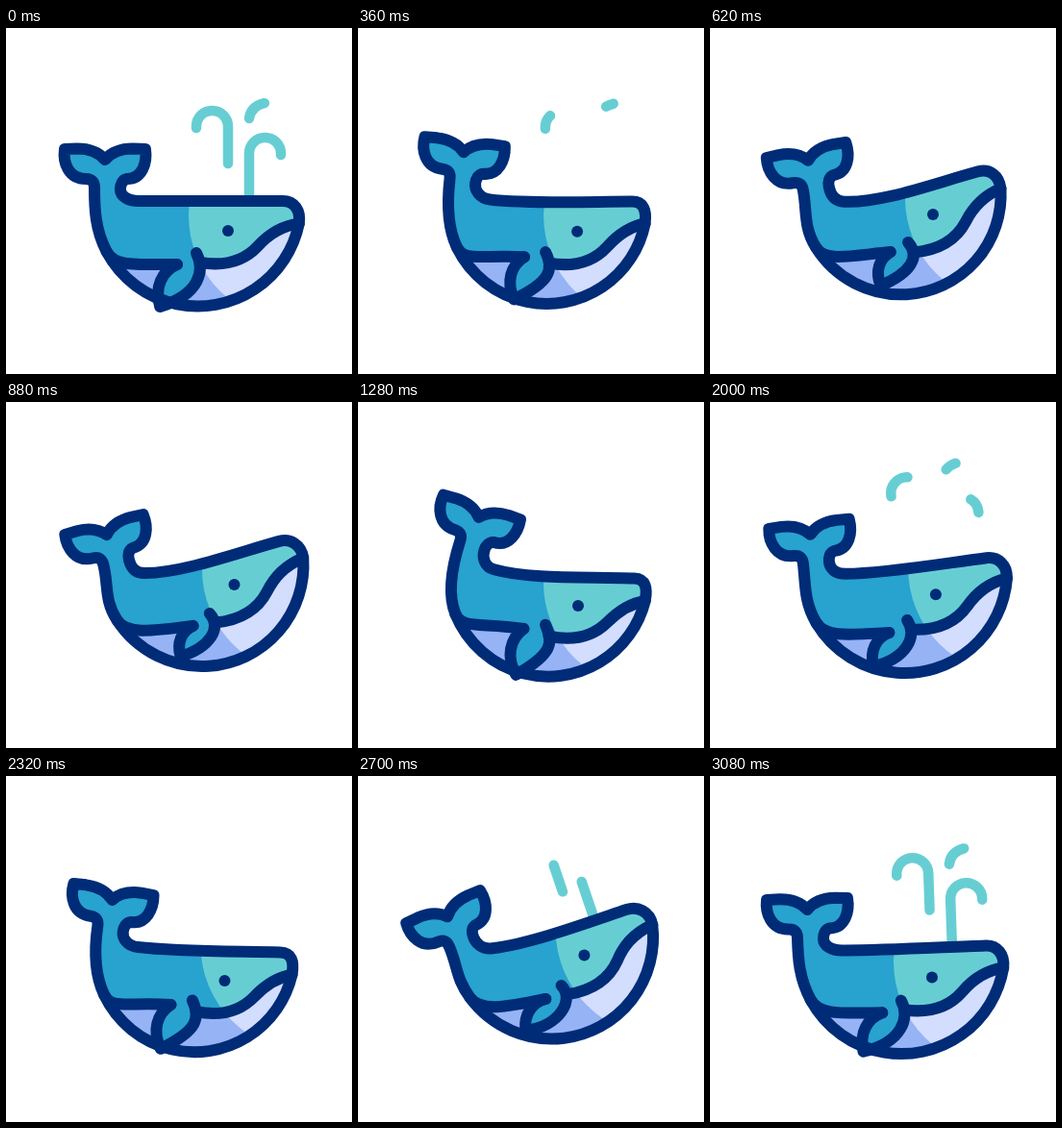
Write an HTML page with a canvas that moves like this. It is 360 px wide and 360 px high and loops after 3.1 s.

```html
<!DOCTYPE html>
<html lang="en">
<head>
<meta charset="utf-8">
<title>Whale</title>
<style>
html, body { margin: 0; width: 100%; height: 100%; overflow: hidden; background: #fff; }
canvas { display: block; width: 360px; height: 360px; }
</style>
</head>
<body>
<canvas id="stage" width="360" height="360"></canvas>
<script>
const ctx = document.getElementById('stage').getContext('2d');
const INK = '#002c77', BLUE = '#28a2ce', TEAL = '#66ced3', BELLY = '#96b3f5', PALE = '#d3ddfd';
const LOOP = 3100, CYCLE = 3000, BEAT = 1000;

// time, pitch, eye x, eye y
const headKeys = [
  [0, 0, 231, 211], [100, 4.5, 230, 219.5], [220, 1.5, 228, 214],
  [520, -15, 232, 194], [620, -19, 239, 186], [780, -15.5, 237.5, 190],
  [980, -1.5, 231.5, 209], [1100, 5, 229, 216.5], [1180, 2.5, 229, 212],
  [1600, -19.5, 244, 183], [1640, -19.7, 244, 183], [1780, -15.5, 241, 188],
  [1980, -1.5, 231, 209], [2100, 4.5, 228, 217], [2220, 1.5, 227.5, 213],
  [2520, -15, 230, 194], [2620, -19, 236, 186], [2780, -15, 235, 191],
  [2980, -2, 231, 209.5]
];
// time, angle, centre x, centre y
const tailKeys = [
  [0, 0, 103, 126], [100, 15, 120, 119], [220, 9, 113, 118],
  [520, -11, 100, 127], [620, -24, 92, 136], [780, -14.4, 102, 127.5],
  [980, -1.4, 103, 126], [1090, 21, 132, 105], [1180, 17.8, 129, 109.5],
  [1600, -26.6, 95, 136.5], [1640, -26.8, 95, 137], [1780, -15, 103, 128],
  [1980, -1, 103, 126], [2100, 12, 116, 117], [2220, 8.3, 112, 118],
  [2520, -12, 96, 128], [2620, -25, 88, 137], [2780, -15, 96, 129],
  [2980, -1.4, 101, 128]
];
// time, offset of the light patch from the eye
const lightKeys = [
  [0, 70, -16], [520, 82, -17], [780, 77.5, -16], [1180, 75, -24],
  [1600, 77.6, -18], [2220, 86, -37], [2980, 71, -16]
];
// beat time, flank lift, fin direction, fin length
const finKeys = [
  [0, 0, 112, 47.5], [180, -8.7, 99.5, 48.6], [220, -8.6, 103, 47],
  [520, -8.5, 106, 36.5], [600, -4.8, 122.5, 39], [780, -5, 112, 34.5],
  [980, 0, 116, 45]
];

// Periodic monotone cubic through the keys
function sample(keys, t, period) {
  const n = keys.length;
  const at = i => {
    const w = Math.floor(i / n), k = keys[i - w * n];
    return [k[0] + w * period, ...k.slice(1)];
  };
  let i = n - 1;
  while (keys[i][0] > t) i--;
  const [a, b, c, d] = [at(i - 1), at(i), at(i + 1), at(i + 2)];
  const h = c[0] - b[0], u = (t - b[0]) / h;
  const mix = (p, q) => p * q > 0 ? 2 * p * q / (p + q) : 0;
  return b.slice(1).map((v, j) => {
    j++;
    const s0 = (b[j] - a[j]) / (b[0] - a[0]);
    const s1 = (c[j] - b[j]) / h;
    const s2 = (d[j] - c[j]) / (d[0] - c[0]);
    const m0 = mix(s0, s1) * h, m1 = mix(s1, s2) * h;
    const u2 = u * u, u3 = u2 * u;
    return v * (2 * u3 - 3 * u2 + 1) + m0 * (u3 - 2 * u2 + u) +
      c[j] * (3 * u2 - 2 * u3) + m1 * (u3 - u2);
  });
}

const rad = d => d * Math.PI / 180;
const add = (p, q) => [p[0] + q[0], p[1] + q[1]];
const mid = (p, q) => [(p[0] + q[0]) / 2, (p[1] + q[1]) / 2];
const clamp = v => Math.max(0, Math.min(1, v));
const polar = (len, deg) => [len * Math.cos(rad(deg)), len * Math.sin(rad(deg))];
function turn(x, y, deg) {
  const c = Math.cos(rad(deg)), s = Math.sin(rad(deg));
  return [x * c - y * s, x * s + y * c];
}
const move = (p, q) => p.moveTo(...q);
const line = (p, q) => p.lineTo(...q);
const curve = (p, a, b, c) => p.bezierCurveTo(...a, ...b, ...c);

function stroke(path, color = INK, width = 12) {
  ctx.strokeStyle = color;
  ctx.lineWidth = width;
  ctx.stroke(path);
}
function fill(path, color) {
  ctx.fillStyle = color;
  ctx.fill(path);
}

const hook = (x, y0, y1, dir) => {
  const p = new Path2D();
  p.moveTo(x, y0);
  p.lineTo(x, y1);
  p.arc(x + dir * 16.5, y1, 16.5, dir > 0 ? Math.PI : 0, dir > 0 ? 0 : Math.PI, dir < 0);
  p.lineTo(x + dir * 33, y1 + 1.5);
  return p;
};
const drop = new Path2D('M253 94 Q255 81 269.5 78');
// path, length, draw start and end, erase start
const jets = [
  [hook(253, 178, 130.5, 1), 101, 0, 200, 560],
  [hook(231, 141, 102.5, -1), 92, 20, 210, 590],
  [drop, 24, 310, 400, 620]
];

function spout(u, eye, pitch) {
  ctx.save();
  ctx.translate(...eye);
  ctx.rotate(rad(pitch));
  ctx.translate(-231, -211);
  for (const [path, len, start, end, out] of jets) {
    const head = clamp((u - start) / (end - start)) * len;
    const tail = clamp((u - out) / 180) * len;
    if (head - tail < 0.5) continue;
    ctx.setLineDash([head - tail, 400]);
    ctx.lineDashOffset = -tail;
    stroke(path, TEAL, 10.5);
  }
  ctx.restore();
}

function draw(t) {
  const [pitch, ex, ey] = sample(headKeys, t, CYCLE);
  const [bend, cx, cy] = sample(tailKeys, t, CYCLE);
  const [lx, ly] = sample(lightKeys, t, CYCLE);
  const [lift, finDir, finLen] = sample(finKeys, t % BEAT, BEAT);
  const eye = [ex, ey];
  const body = (x, y) => add(eye, turn(x - 231, y - 211, pitch));
  const tail = (x, y) => add([cx, cy], turn(x, y, bend));

  // Round belly
  const hub = add(eye, [-31.5 + 0.13 * pitch, -29 - 0.55 * pitch]);
  const r = 107.5 + 0.4 * lift;
  const jaw = 11.6 + pitch, rump = 152 + 0.35 * bend;
  const mouth = add(hub, polar(r, jaw));
  const flank = add(hub, polar(r, rump));
  const joint = mid(body(138, 180), tail(35, 54));
  const slope = bend - 0.9 * pitch;
  const brow = body(288, 180);

  const top = p => {
    move(p, tail(-42, 0));
    line(p, tail(-29, -0.5));
    curve(p, tail(-16, -0.5), tail(-6, 4), tail(0, 11));
    curve(p, tail(6, 4), tail(16, -0.5), tail(29, -0.5));
    line(p, tail(42, 0));
    curve(p, tail(44, 14), tail(39, 31), tail(23, 31));
    curve(p, tail(18, 32), tail(16, 37), tail(16, 42));
    curve(p, tail(16, 49), add(joint, polar(-11, slope)), joint);
    curve(p, add(joint, polar(40, slope)), body(242, 180), brow);
    curve(p, body(300, 180), add(mouth, turn(2, -14, pitch)), mouth);
  };
  const back = p => {
    curve(p, add(flank, polar(25, rump + 90)), tail(-11, 62), tail(-11, 40));
    curve(p, tail(-11, 35), tail(-13, 31), tail(-20, 31));
    curve(p, tail(-38, 31), tail(-44, 14), tail(-42, 0));
    p.closePath();
  };
  const lip = p => {
    curve(p, body(285, 206), body(272, 216), body(262, 227));
    curve(p, body(250, 240), body(232, 249), body(202, 244));
  };

  const outline = new Path2D();
  top(outline);
  outline.arc(...hub, r, rad(jaw), rad(rump));
  back(outline);

  // Fin
  const pit = add(add(eye, turn(-53, 35, pitch)), [lift * 0.25, lift]);
  const tip = add(pit, polar(finLen, finDir));
  const root = add(body(198, 234), [0, lift * 0.2]);
  const k = finLen / 47.5;
  const near = (p, x, y) => add(p, turn(x * k, y * k, finDir - 112));
  const fin = new Path2D();
  move(fin, root);
  curve(fin, add(root, turn(9, 18, pitch)), near(tip, 42, -13), tip);
  curve(fin, near(tip, -6, -20), near(pit, -16, 7), pit);

  const side = p => curve(p, add(pit, polar(-45, bend * 0.5)),
    add(flank, polar(-18, rump + 90)), flank);

  const upper = new Path2D();
  top(upper);
  lip(upper);
  line(upper, pit);
  side(upper);
  back(upper);

  const lines = new Path2D();
  move(lines, mouth);
  lip(lines);
  move(lines, pit);
  side(lines);

  const light = new Path2D();
  light.arc(ex + lx, ey + ly, 111, 0, 7);

  ctx.fillStyle = '#fff';
  ctx.fillRect(0, 0, 360, 360);
  ctx.lineCap = ctx.lineJoin = 'round';

  for (const start of [1190, 2520]) spout((t - start + CYCLE) % CYCLE, eye, pitch);

  for (const [shape, dark, pale] of [[outline, BELLY, PALE], [upper, BLUE, TEAL]]) {
    fill(shape, dark);
    ctx.save();
    ctx.clip(shape);
    fill(light, pale);
    ctx.restore();
  }
  fill(fin, BLUE);
  stroke(outline);
  stroke(lines);
  stroke(fin);

  const dot = new Path2D();
  dot.arc(ex, ey, 6, 0, 7);
  fill(dot, INK);
}

const began = performance.now();
function tick() {
  const t = (performance.now() - began) % LOOP;
  // Rest on the first pose, then advance in 20 ms steps
  draw(Math.max(0, Math.floor(t / 20) * 20 - 100));
  requestAnimationFrame(tick);
}
tick();
</script>
</body>
</html>
```
